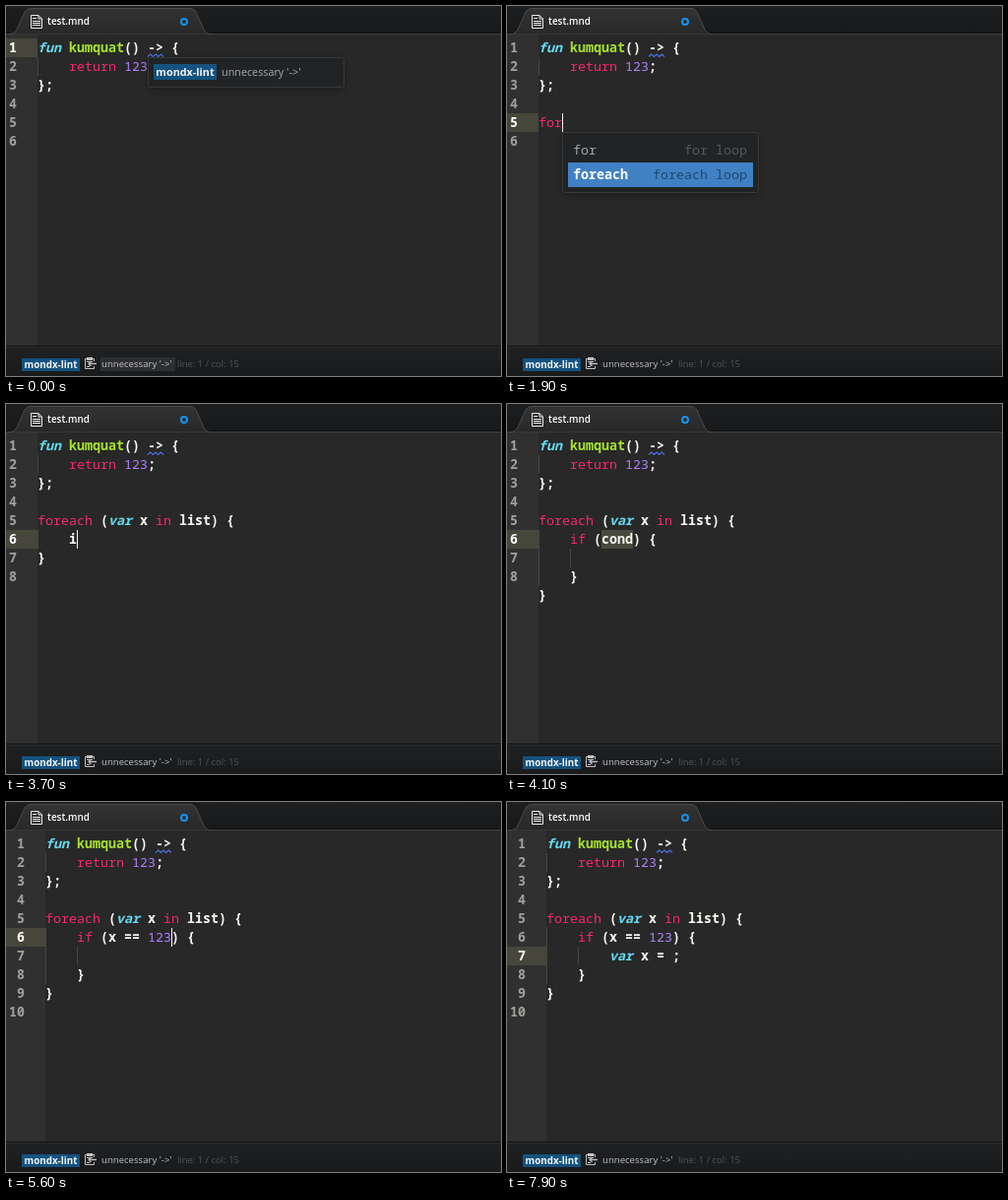
An HTML page with a canvas for the animation above (8000 ms loop, 503 by 376 pixels).

```html
<!DOCTYPE html>
<html lang="en">
<head>
<meta charset="utf-8">
<title>Editor</title>
<style>
  html, body { margin: 0; width: 100%; height: 100%; overflow: hidden; background: #272727; }
  canvas { display: block; width: 503px; height: 376px; }
</style>
</head>
<body>
<canvas id="stage"></canvas>
<script>
const W = 503, H = 376, LOOP = 8000;
const CHAR = 8, ROW = 19, TOP = 33;
const MONO = '"Noto Sans Mono", "DejaVu Sans Mono", monospace';
const SANS = '"Open Sans", "Noto Sans", sans-serif';
const WHITE = '#f8f8f2', PINK = '#f92672', CYAN = '#66d9ef', GREEN = '#a6e22e', PURPLE = '#ae81ff';

const canvas = document.getElementById('stage');
const ctx = canvas.getContext('2d');
const dpr = window.devicePixelRatio || 1;
canvas.width = W * dpr;
canvas.height = H * dpr;

const head = ['fun kumquat() -> {', '    return 123;', '};', ''];
const loop = 'foreach (var x in list) {';
const loopBody = [loop, '    ', '}', ''];
const ifBody = (cond, inner = '') =>
  [loop, `    if (${cond}) {`, '        ' + inner, '    }', '}', ''];

const forItem = ['for', 'for loop'], eachItem = ['foreach', 'foreach loop'];
const funItem = ['fun', 'function'], ifItem = ['if', 'if'], varItem = ['var', 'var'];

// Each step is merged into the state at its time.
const steps = [
  [0, { body: ['', ''], count: 6, row: 0, col: 14, caret: false, sel: 0, items: null, pick: 0, hint: true }],
  [500, { row: 4, col: 0, caret: true, hint: false }],
  [900, { caret: false }],
  [1300, { caret: true }],
  [1400, { body: ['f', ''], col: 1, items: [forItem, eachItem, funItem] }],
  [1500, { body: ['fo', ''], col: 2, items: [forItem, eachItem] }],
  [1600, { body: ['for', ''], col: 3 }],
  [1900, { pick: 1 }],
  [2000, { caret: false }],
  [2200, { body: loopBody, items: null, pick: 0, col: 13, sel: 1 }],
  [2300, { count: 8 }],
  [2700, { col: 18, sel: 4 }],
  [3000, { row: 5, col: 4, sel: 0, caret: true }],
  [3500, { caret: false }],
  [3700, { body: [loop, '    i', '}', ''], col: 5, caret: true }],
  [3800, { body: [loop, '    if', '}', ''], col: 6, items: [ifItem] }],
  [4100, { body: ifBody('cond'), items: null, col: 8, sel: 4, caret: false }],
  [4200, { count: 10 }],
  [4600, { body: ifBody('x'), col: 9, sel: 0, caret: true }],
  [4900, { body: ifBody('x '), col: 10 }],
  [5100, { body: ifBody('x ='), col: 11 }],
  [5200, { body: ifBody('x =='), col: 12 }],
  [5300, { body: ifBody('x == '), col: 13 }],
  [5500, { body: ifBody('x == 12'), col: 15 }],
  [5600, { body: ifBody('x == 123'), col: 16 }],
  [5900, { row: 6, col: 8 }],
  [6300, { body: ifBody('x == 123', 'v'), col: 9, items: [varItem] }],
  [6500, { body: ifBody('x == 123', 'var'), col: 11 }],
  [6900, { body: ifBody('x == 123', 'var x = ;'), items: null, col: 12, sel: 1, caret: false }],
  [7500, { col: 16, sel: 0, caret: true }],
  [7900, { caret: false }]
];

const stateAt = t => Object.assign({}, ...steps.filter(s => s[0] <= t).map(s => s[1]));

function rect(x, y, w, h, color) {
  ctx.fillStyle = color;
  ctx.fillRect(x, y, w, h);
}

function text(str, x, y, color, font, align = 'left') {
  ctx.font = font;
  ctx.fillStyle = color;
  ctx.textAlign = align;
  ctx.fillText(str, x, y);
}

const mono = (weight = 500, style = 'normal') => `${style} ${weight} 13.333px ${MONO}`;
const sans = (size, weight = 400) => `${weight} ${size}px ${SANS}`;

function path(points, color, width = 1) {
  ctx.beginPath();
  points.forEach(([x, y], i) => i ? ctx.lineTo(x, y) : ctx.moveTo(x, y));
  ctx.strokeStyle = color;
  ctx.lineWidth = width;
  ctx.stroke();
}

function gradient(y0, y1, from, to) {
  const g = ctx.createLinearGradient(0, y0, 0, y1);
  g.addColorStop(0, from);
  g.addColorStop(1, to);
  return g;
}

function tabBar() {
  rect(0, 0, W, 29, gradient(0, 29, '#1d1e1f', '#18191a'));
  rect(0, 27, W, 1, '#0e0e0f');
  rect(0, 28, W, 1, '#444546');
  ctx.beginPath();
  ctx.moveTo(3, 28.5);
  ctx.quadraticCurveTo(9, 28.5, 11, 24);
  ctx.lineTo(19, 6);
  ctx.quadraticCurveTo(21, 2.5, 25, 2.5);
  ctx.lineTo(187, 2.5);
  ctx.quadraticCurveTo(191, 2.5, 193, 6);
  ctx.lineTo(201, 24);
  ctx.quadraticCurveTo(203, 28.5, 208, 28.5);
  ctx.fillStyle = gradient(2, 29, '#333334', '#282828');
  ctx.fill();
  ctx.strokeStyle = '#4a4b4c';
  ctx.lineWidth = 1;
  ctx.stroke();
  fileIcon();
  text('test.mnd', 42, 19, '#ffffff', sans(9.9, 600));
  ctx.beginPath();
  ctx.arc(181, 16, 3, 0, 7);
  ctx.strokeStyle = '#1593f0';
  ctx.lineWidth = 2;
  ctx.stroke();
}

function fileIcon() {
  path([[33, 9.5], [25.5, 9.5], [25.5, 22.5], [36.5, 22.5], [36.5, 13], [33, 9.5], [33, 13], [36.5, 13]], '#ececec');
  for (const y of [12.5, 15.5, 17.5, 19.5]) path([[27, y], [y < 13 ? 31 : 35, y]], '#ececec');
}

function label(x, y, w, h, size) {
  rect(x, y, w, h, '#14527f');
  text('mondx-lint', x + w / 2, y + h * .76, '#f4f7fa', sans(size, 700), 'center');
}

function statusBar(hint) {
  rect(0, 345, W, 31, gradient(345, 376, '#202123', '#191a1c'));
  rect(0, 345, W, 1, '#0f0f10');
  rect(0, 346, W, 1, '#2c2d2f');
  label(16, 358, 59, 13, 9.8);
  clipboard();
  if (hint) rect(96, 357, 76, 14, '#2d2e30');
  text("unnecessary '->'", 97, 367, '#c0c1c3', sans(9.6));
  text('line: 1 / col: 15', 174, 367, '#50545a', sans(9.45));
}

function clipboard() {
  const c = '#c2c2c2';
  path([[89.5, 361], [89.5, 358.5], [80.5, 358.5], [80.5, 368.5], [89.5, 368.5], [89.5, 366]], c);
  rect(82, 357, 6, 3, c);
  path([[82, 361.5], [88, 361.5]], c);
  path([[82, 366.5], [85, 366.5]], c);
  path([[92, 363.5], [84, 363.5]], c, 1.4);
  path([[86.5, 361], [84, 363.5], [86.5, 366]], c, 1.2);
}

function styleOf(word) {
  if (/^(fun|var)$/.test(word)) return [CYAN, 700, 'italic'];
  if (/^(for|foreach|if|in|return)$/.test(word)) return [PINK, 500];
  if (word === 'kumquat') return [GREEN, 600];
  if (/^\d+$/.test(word)) return [PURPLE, 500];
  return [WHITE, 680];
}

function codeLine(line, x, y) {
  for (const m of line.matchAll(/\w+|[^\w\s]+/g)) {
    const [color, weight, style] = styleOf(m[0]);
    text(m[0], x + m.index * CHAR, y + 14, color, mono(weight, style));
  }
}

function squiggle(x, y) {
  const pts = [];
  for (let i = 0; i <= 6; i++) pts.push([x + i * 8 / 3, y + (i % 2 ? 0 : 2.5)]);
  path(pts, '#4f6fe0', 1.2);
}

function panel(x, y, w, h) {
  ctx.save();
  ctx.shadowColor = 'rgba(0,0,0,.35)';
  ctx.shadowBlur = 8 * dpr;
  ctx.shadowOffsetY = 2 * dpr;
  ctx.beginPath();
  ctx.roundRect(x + .5, y + .5, w - 1, h - 1, 2);
  ctx.fillStyle = '#222324';
  ctx.fill();
  ctx.restore();
  ctx.strokeStyle = '#37383a';
  ctx.lineWidth = 1;
  ctx.stroke();
}

function popup(items, pick, x, y) {
  panel(x, y, 200, items.length * 25 + 12);
  items.forEach(([name, info], i) => {
    const top = y + 6 + i * 25, on = i === pick;
    if (on) rect(x + 6, top, 188, 25, '#4081c4');
    text(name, x + 11, top + 17, on ? '#ffffff' : '#a3a4a6', mono(on ? 700 : 500));
    text(info, x + 188, top + 17, on ? '#20476f' : '#55575a', mono(500), 'right');
  });
}

function tooltip() {
  panel(144, 52, 200, 31);
  label(150, 59, 64, 16, 10.8);
  text("unnecessary '->'", 219, 71, '#a9aaac', sans(10.8));
}

function editor(s) {
  const left = s.count > 9 ? 40 : 32;
  const lines = head.concat(s.body);
  const rowY = i => TOP + i * ROW;
  const caretX = left + s.col * CHAR, caretY = rowY(s.row);

  rect(0, 29, W, 316, '#282828');
  rect(0, 29, left, 316, '#303030');
  rect(0, caretY, left, ROW, '#47463b');
  for (let i = 0; i < s.count; i++) {
    const color = i === s.row ? '#ffffff' : '#a0a19c';
    text(i + 1, left - 21, rowY(i) + 14, color, mono(650), 'right');
  }
  if (s.sel) rect(caretX, caretY, s.sel * CHAR, ROW, '#4a4940');
  lines.forEach((line, i) => {
    const indent = line.match(/^ */)[0].length;
    for (let c = 0; c < indent; c += 4) rect(left + c * CHAR, rowY(i), 1, ROW, '#454545');
    codeLine(line, left, rowY(i));
  });
  squiggle(left + 14 * CHAR, 49);
  if (s.caret) rect(caretX, caretY, 1, ROW, '#f8f8f0');
  if (s.items) popup(s.items, s.pick, caretX, caretY + ROW);
  if (s.hint) tooltip();
}

const start = performance.now();

function draw() {
  const s = stateAt(Math.max(0, performance.now() - start) % LOOP);
  ctx.setTransform(dpr, 0, 0, dpr, 0, 0);
  editor(s);
  tabBar();
  statusBar(s.hint);
  requestAnimationFrame(draw);
}
draw();
</script>
</body>
</html>
```
